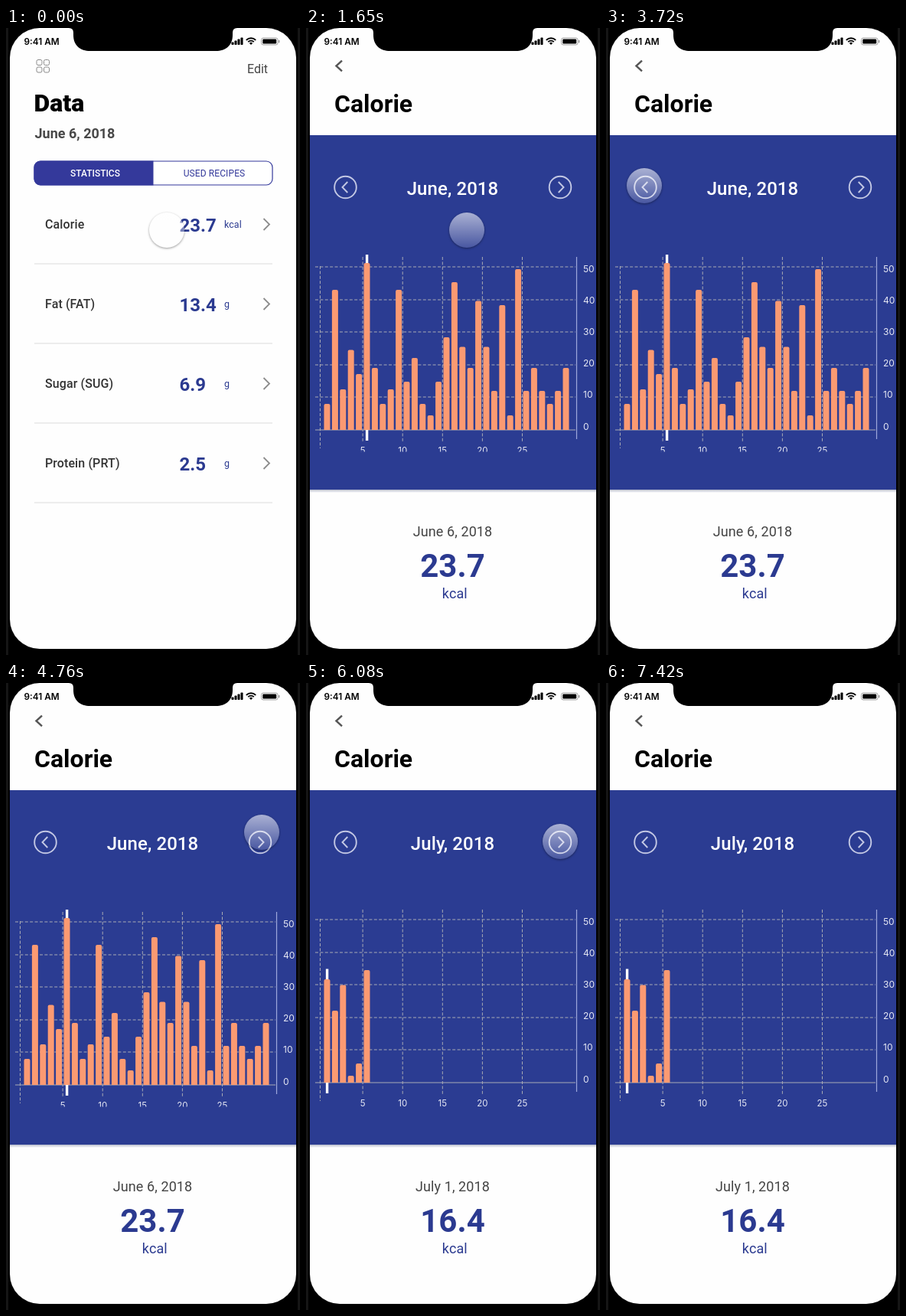
These frames come from a looping animation (384x819 px, 7940 ms). An HTML page:

```html
<!DOCTYPE html>
<html lang="en">
<head>
<meta charset="utf-8">
<title>Nutrition data</title>
<style>
  html, body { margin: 0; width: 100%; height: 100%; overflow: hidden; background: #000; }
  #stage { position: relative; width: 384px; height: 819px; overflow: hidden; }
  svg { position: absolute; left: 0; top: 0; }
  text { font-family: Roboto, sans-serif; }
  .ui { font-family: Inter, sans-serif; }
  #touch {
    position: absolute; left: -23px; top: -23px; width: 46px; height: 46px; border-radius: 50%;
    background: linear-gradient(rgba(255,255,255,.6), rgba(255,255,255,.14));
    box-shadow: 0 1px 3px rgba(0,0,0,.4);
  }
</style>
</head>
<body>
<div id="stage">
  <svg id="art" width="384" height="819" viewBox="0 0 384 819"></svg>
  <div id="touch"></div>
</div>
<script>
const LOOP = 7940, TICK = 147, TICK_START = 1350;
const OPEN = 1650, NEXT_MONTH = 5490, LIFT = 6220;
const INDIGO = '#2b3a90', GRID = '#a8aab4';

const text = (x, y, size, weight, fill, str, extra = '') =>
  `<text x="${x}" y="${y}" font-size="${size}" font-weight="${weight}" fill="${fill}" ${extra}>${str}</text>`;
const mid = 'text-anchor="middle"';
const spaced = n => `letter-spacing="${n}"`;
const rect = (x, y, w, h, fill, extra = '') =>
  `<rect x="${x}" y="${y}" width="${w}" height="${h}" fill="${fill}" ${extra}/>`;
const line = (x1, y1, x2, y2, stroke, width = 1, extra = '') =>
  `<path d="M${x1} ${y1}L${x2} ${y2}" stroke="${stroke}" stroke-width="${width}" ${extra}/>`;
// Chevron with its tip at (x, y); dx points back to the open side.
const chevron = (x, y, dx, dy, stroke, width) =>
  `<path d="M${x + dx} ${y - dy}L${x} ${y}L${x + dx} ${y + dy}" fill="none" stroke="${stroke}" stroke-width="${width}"/>`;

function listScreen() {
  const rows = [
    ['Calorie', '23.7', 'kcal'], ['Fat (FAT)', '13.4', 'g'],
    ['Sugar (SUG)', '6.9', 'g'], ['Protein (PRT)', '2.5', 'g']
  ];
  let out = '';
  for (const x of [40, 49.5]) for (const y of [41.5, 51])
    out += rect(x, y, 7, 7, 'none', 'rx="2" stroke="#8a8a8a"');
  out += text(315, 59, 16, 400, '#444', 'Edit')
    + text(36.5, 109, 32, 900, '#000', 'Data')
    + text(37.5, 144, 18, 600, '#484848', 'June 6, 2018')
    + rect(37, 174, 311, 31, '#fff', `rx="8" stroke="#34399b" stroke-width="1.2"`)
    + '<path d="M192.5 173.4H45a8.5 8.5 0 0 0-8.5 8.5V197a8.5 8.5 0 0 0 8.5 8.5H192.5Z" fill="#34399b"/>'
    + text(116.5, 193.5, 12, 500, '#fff', 'STATISTICS', mid)
    + text(272, 193.5, 12, 400, '#34399b', 'USED RECIPES', mid + ' ' + spaced(.1));
  rows.forEach(([name, value, unit], i) => {
    const y = 256 + 104 * i;
    out += text(51, y + 6, 16, 500, '#333', name, spaced(.1))
      + text(226.5, y + 9.5, 24, 700, INDIGO, value)
      + text(285, y + 4.5, 12.4, 400, INDIGO, unit, spaced(.1))
      + chevron(344, y + .5, -7.5, 7.5, '#8c8c8c', 1.8)
      + line(37, y + 52, 348, y + 52, '#dedede', 1.2);
  });
  return out;
}

function chart(month) {
  let out = '';
  const dash = 'stroke-dasharray="4 2.4"';
  for (let i = 0; i < 6; i++) {
    const y = Math.round(525 - 42.6 * i);
    out += line(12, y, 352, y, GRID, 1, i ? dash : '')
      + text(362, 524.5 - 41.2 * i, 12, 400, '#e6e8f4', i * 10, 'class="ui"');
    const x = 22 + 52.1 * i;
    if (i) out += line(x, 299, x, 541, GRID, 1, dash)
      + (i < 6 ? text(x, 556, 11.5, 400, '#e6e8f4', i * 5, 'class="ui" ' + mid) : '');
  }
  out += line(18.5, 311, 18.5, 549, GRID, 1, dash)
    + line(353.5, 299, 353.5, 537, '#9fa8dc', 1.2)
    + line(27.6 + 10.4 * month.day, month.top, 27.6 + 10.4 * month.day, 539, '#fff', 3.4);
  month.bars.forEach((h, i) => {
    const x = 23.5 + 10.4 * i, y = 525 - h;
    out += `<path d="M${x} 525V${y + 2}q0-2 2-2h4q2 0 2 2V525Z" fill="#fb9a72"/>`;
  });
  return `<g clip-path="url(#plot)"><g transform="translate(0 ${month.shift})">${out}</g></g>`;
}

function monthView(month) {
  return text(191.5, 217.5, 24, 500, '#fff', month.title, mid + ' ' + spaced(.1))
    + chart(month)
    + text(191.5, 664, 18, 400, '#444', month.date, mid + ' ' + spaced(.1))
    + text(191.5, 716.5, 42, 700, INDIGO, month.value, mid);
}

function detailFrame() {
  const ring = x => `<circle cx="${x}" cy="208" r="14.3" fill="none" stroke="#c3c8e4" stroke-width="1.9"/>`;
  return chevron(39.5, 49.5, 7.5, 6.8, '#555', 2.4)
    + text(37, 110, 32, 700, '#000', 'Calorie')
    + rect(5, 603, 374, 4, 'url(#fade)')
    + rect(5, 140, 374, 463, '#2b3c92')
    + ring(51.5) + chevron(47.5, 208, 6.8, 7, '#c3c8e4', 1.9)
    + ring(332) + chevron(336.5, 208, -6.8, 7, '#c3c8e4', 1.9)
    + text(194.3, 745, 18, 400, INDIGO, 'kcal', mid + ' ' + spaced(.1));
}

function statusBar() {
  const arc = (r, w) => `<path d="M${320 - r * .72} ${22 - r * .72}A${r} ${r} 0 0 1 ${320 + r * .72} ${22 - r * .72}" fill="none" stroke="#000" stroke-width="${w}"/>`;
  let out = text(23.5, 21.5, 11.8, 600, '#000', '9:41 AM', 'class="ui"');
  for (let i = 0; i < 4; i++)
    out += rect(294.5 + 4 * i, 18.5 - 2 * i, 3, 3.5 + 2 * i, '#000', 'rx=".7"');
  return out + arc(8.6, 1.9) + arc(5.3, 1.8)
    + '<path d="M320 22l-2.2-2.2a3.1 3.1 0 0 1 4.4 0Z"/>'
    + rect(333.5, 13, 21.5, 9, 'none', 'rx="2.5" stroke="#999" stroke-width=".9"')
    + rect(335.2, 14.6, 18, 5.9, '#000', 'rx="1.2"')
    + rect(356, 15.7, 1.3, 3.6, '#999', 'rx=".6"')
    + '<path d="M82 0Q88 0 88 6V9C88 23 97 30 110 30H274C287 30 296 23 296 9V6Q296 0 302 0Z"/>';
}

const june = {
  title: 'June, 2018', date: 'June 6, 2018', value: '23.7', shift: 0, day: 5, top: 296,
  bars: [34, 183, 53, 104.5, 73, 218, 81, 34, 53, 183, 63, 94, 34, 19, 63, 121,
    193, 108.5, 81, 168.5, 108.5, 51, 163, 19, 210, 51, 81, 51, 34, 51, 81]
};
const july = {
  title: 'July, 2018', date: 'July 1, 2018', value: '16.4', shift: -3, day: 0, top: 376.5,
  bars: [135, 94, 127.5, 9, 25, 147]
};

document.getElementById('art').innerHTML = `
  <defs>
    <clipPath id="plot"><rect x="5" y="280" width="374" height="273.5"/></clipPath>
    <linearGradient id="fade" x2="0" y2="1">
      <stop stop-color="#b8bccb"/><stop offset="1" stop-color="#fff"/>
    </linearGradient>
  </defs>
  ${rect(0, 0, 3, 819, '#151515')}${rect(381, 0, 3, 819, '#151515')}
  ${rect(5, 0, 374, 811, '#fefefe', 'rx="39"')}
  <g id="list">${listScreen()}</g>
  <g id="detail">${detailFrame()}
    <g id="june">${monthView(june)}</g>
    <g id="july">${monthView(july)}</g>
  </g>
  ${statusBar()}`;

// Finger path: time, x, y.
const path = [
  [0, 210, 264], [2130, 210, 264], [2960, 47, 205], [3420, 50, 206],
  [4440, 50, 206], [4731, 334, 195], [4878, 332, 207], [LOOP, 332, 207]
];
const presses = [[1350, 1650], [3420, 3700], [5200, NEXT_MONTH]];

function fingerAt(t) {
  const i = path.findIndex(k => k[0] > t);
  const [t0, x0, y0] = path[i - 1], [t1, x1, y1] = path[i];
  const p = (t - t0) / (t1 - t0), e = p * p * (3 - 2 * p);
  return [x0 + (x1 - x0) * e, y0 + (y1 - y0) * e];
}

const el = id => document.getElementById(id);
const show = (id, on) => { el(id).style.display = on ? '' : 'none'; };

function draw(now) {
  const t = now % LOOP;
  show('list', t < OPEN);
  show('detail', t >= OPEN);
  show('june', t < NEXT_MONTH);
  show('july', t >= NEXT_MONTH);
  show('touch', t < LIFT);

  const tick = t < TICK_START ? 0 : TICK_START + Math.floor((t - TICK_START) / TICK) * TICK;
  const [x, y] = fingerAt(tick);
  const pressed = presses.some(([a, b]) => t >= a && t < b);
  el('touch').style.transform = `translate(${x}px, ${y}px) scale(${pressed ? .96 : 1})`;
}

const start = performance.now();
function loop() {
  draw(performance.now() - start);
  requestAnimationFrame(loop);
}
loop();
</script>
</body>
</html>
```
